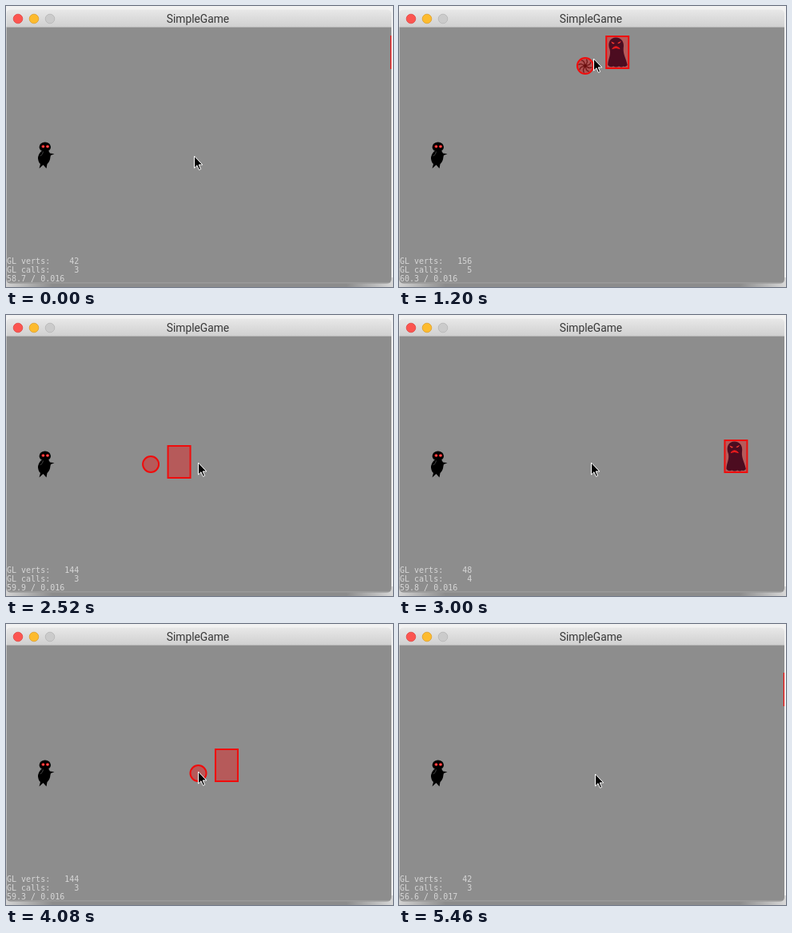
An HTML page for the animation above (5520 ms loop, 484x352 px).

```html
<!DOCTYPE html>
<html lang="en">
<head>
<meta charset="utf-8">
<title>SimpleGame</title>
<style>
  html, body { margin: 0; width: 100%; height: 100%; overflow: hidden; background: #f4f4f4; }
  svg { display: block; width: 100vw; height: 100vh; }
  .title { font: 13.8px Roboto, sans-serif; fill: #383838; text-anchor: middle; }
  .stats { font: 10px "DejaVu Sans Mono", monospace; fill: #d6d6d6; }
  .debug { fill: #ff0000; fill-opacity: .36; stroke: #f00c0c; stroke-width: 2; }
</style>
</head>
<body>
<svg viewBox="0 0 484 352">
  <defs>
    <linearGradient id="bar" x2="0" y2="1">
      <stop offset="0" stop-color="#e8e8e8"/>
      <stop offset="1" stop-color="#cfcfcf"/>
    </linearGradient>
    <linearGradient id="shade">
      <stop offset="0" stop-color="#d2d2d2"/>
      <stop offset=".12" stop-color="#8c8c8c"/>
      <stop offset=".88" stop-color="#8c8c8c"/>
      <stop offset="1" stop-color="#d8d8d8"/>
    </linearGradient>
    <clipPath id="win"><path d="M.5 27H482V342Q482 347.500 476 347.500H6Q.5 347.500 .5 342Z"/></clipPath>
  </defs>

  <rect width="484" height="352" fill="#f2f2f2"/>
  <rect y="340" width="484" height="12" fill="url(#shade)"/>
  <path d="M.5 27V10Q.5 4.500 6 4.500H476Q482 4.500 482 10V27Z" fill="url(#bar)"/>
  <path d="M.5 26.500H482" stroke="#b4b4b4"/>
  <g stroke-width=".8">
    <circle cx="15" cy="16" r="5.800" fill="#fc5550" stroke="#df4541"/>
    <circle cx="35" cy="16" r="5.800" fill="#fdbb2e" stroke="#de9f2a"/>
    <circle cx="55" cy="16" r="5.800" fill="#cbcbcb" stroke="#b5b5b5"/>
  </g>
  <text class="title" x="240" y="21">SimpleGame</text>

  <g clip-path="url(#win)">
    <rect y="27" width="484" height="322" fill="#8d8d8d"/>
    <path d="M0 347H484" stroke="#a8a8a8"/>
    <g id="player">
      <path d="M44 182Q40 186 40 191Q40.500 196 43 198L41.500 203.500L46.500 199L50.500 203.500L51.500 198Q55 195 55.500 189L56 187L60.500 185.300L55 184.500L53 181Z"/>
      <ellipse cx="48.800" cy="176.700" rx="7.200" ry="6.200"/>
      <path d="M43 188Q46 186 46.500 182.500" fill="none" stroke="#4a4a4a" stroke-width=".9"/>
      <g fill="#ffc8c8" stroke="#f01818" stroke-width="1.200">
        <ellipse cx="46.500" cy="176" rx="1.500" ry="1.200"/>
        <ellipse cx="52" cy="176" rx="1.500" ry="1.200"/>
      </g>
    </g>

    <g id="monster">
      <rect class="debug" x="1" y="1" width="28" height="40"/>
      <g id="ghost">
        <path d="M3 37C3 30 7 25 5.500 18C2 9 6 2.500 13 2.500C20 2.500 24 8 22.500 16C22 24 26 29 27.500 37Q25 40 22.500 38.500Q20 40.500 17 38.500Q13 40.500 10 38.500Q6 40.500 3 37Z" fill="#4c0c20"/>
        <path d="M7 7.500L11.500 9.500Q9 12 7 7.500ZM19.500 7L15 9.300Q17.500 11.700 19.500 7Z" fill="#ff3a30"/>
        <path d="M8.500 16.500Q13 11 18 16.500Q13 14.500 8.500 16.500Z" fill="#f01c1c" stroke="#f01c1c"/>
      </g>
    </g>

    <g id="shot">
      <g id="star">
        <circle r="9" fill="#808080"/>
        <g id="blades" fill="none" stroke="#222" stroke-width="1.300"></g>
        <circle r="2" fill="#161616"/>
      </g>
      <circle class="debug" r="10"/>
    </g>

    <g class="stats">
      <text id="verts" x="1" y="323"></text>
      <text id="calls" x="1" y="334"></text>
      <text id="fps" x="1" y="345"></text>
    </g>
  </g>

  <path id="cursor" d="M.5 0V15L4 11.700L6.400 17.300L8.600 16.400L6.200 10.900H10.800Z" stroke-linejoin="round"/>
</svg>

<script>
const LOOP = 5520, STEP = 60, STATS_STEP = 90;
const SHOT_SPEED = 0.55, HERO = { x: 48, y: 187 }, EDGE = 480.8;
const $ = id => document.getElementById(id);

// One round per monster; both bodies freeze as bare outlines after the hit.
const rounds = [
  { spawn: 0,    top: 37,  speed: 0.1855, fire: 807,  hit: 1208, aim: [185, -112] },
  { spawn: 1365, top: 163, speed: 0.2743, fire: 2141, hit: 2383, aim: [1, 0] },
  { spawn: 2730, top: 156, speed: 0.2755, fire: 3178, hit: 3528, aim: [1, 0] },
  { spawn: 4095, top: 172, speed: 0.2755, fire: 4700, hit: 4998, aim: [1, 0] },
  { spawn: 5460, top: 61,  speed: 0.2755, fire: 9e9,  hit: 9e9,  aim: [1, 0] }
];

const pointer = [
  [0, 235, 188], [420, 235, 188], [780, 243, 66], [1260, 243, 66],
  [1740, 234, 163], [1860, 234, 163], [1980, 236, 149], [2130, 240, 185],
  [4260, 240, 185], [4380, 243, 159], [4500, 245, 188]
];

const rates = [
  [0, 58.7], [1170, 60.3], [1800, 60.1], [2520, 59.9],
  [3240, 60.0], [4590, 59.2], [5400, 56.6]
];

// Finds the surrounding keys and the fraction between them.
function span(keys, t) {
  let i = keys.length - 1;
  while (i > 0 && keys[i][0] > t) i--;
  const a = keys[i], b = keys[i + 1] || a;
  return { a, b, u: a === b ? 0 : (t - a[0]) / (b[0] - a[0]) };
}

const mix = (a, b, u) => a + (b - a) * u;
const ease = u => u * u * (3 - 2 * u);
const place = (el, x, y) => el.setAttribute("transform", `translate(${x.toFixed(2)} ${y.toFixed(2)})`);
const show = (el, on) => el.setAttribute("visibility", on ? "inherit" : "hidden");
const stat = (label, n) => label.replace(" ", "\u00a0") + String(n).padStart(6, "\u00a0");

function frameRate(t) {
  const { a, b, u } = span(rates, Math.floor(t / STATS_STEP) * STATS_STEP);
  return mix(a[1], b[1], u) + 0.4 * Math.sin(u * Math.PI * 3);
}

function draw(t) {
  const r = rounds.findLast(r => r.spawn <= t);
  const over = t >= r.hit, fired = t >= r.fire;
  const now = Math.min(t, r.hit);

  place($("monster"), EDGE - r.speed * (now - r.spawn), r.top);
  show($("ghost"), !over);

  show($("shot"), fired);
  show($("star"), fired && !over);
  if (fired) {
    const d = SHOT_SPEED * (now - r.fire) / Math.hypot(...r.aim);
    place($("shot"), HERO.x + r.aim[0] * d, HERO.y + r.aim[1] * d);
  }

  const sprites = over || t - r.spawn < 10 ? 0 : fired ? 2 : 1;
  $("verts").textContent = stat("GL verts:", 42 + 6 * sprites + (fired ? 102 : 0));
  $("calls").textContent = stat("GL calls:", 3 + sprites);
  $("fps").textContent = `${frameRate(t).toFixed(1)} / ${t < 4500 ? "0.016" : "0.017"}`;

  const { a, b, u } = span(pointer, t);
  place($("cursor"), mix(a[1], b[1], ease(u)), mix(a[2], b[2], ease(u)));
  const pale = t >= 4560 && t < 4700;
  $("cursor").setAttribute("fill", pale ? "#fff" : "#000");
  $("cursor").setAttribute("stroke", pale ? "#222" : "#fff");
}

$("blades").innerHTML = Array.from({ length: 8 }, (_, i) =>
  `<path d="M0 -1.500Q4 -4 1.500 -8.500" transform="rotate(${i * 45})"/>`).join("");

const start = performance.now();
function tick() {
  const t = (performance.now() - start) % LOOP;
  draw(Math.floor(t / STEP) * STEP);
  requestAnimationFrame(tick);
}
tick();
</script>
</body>
</html>
```
